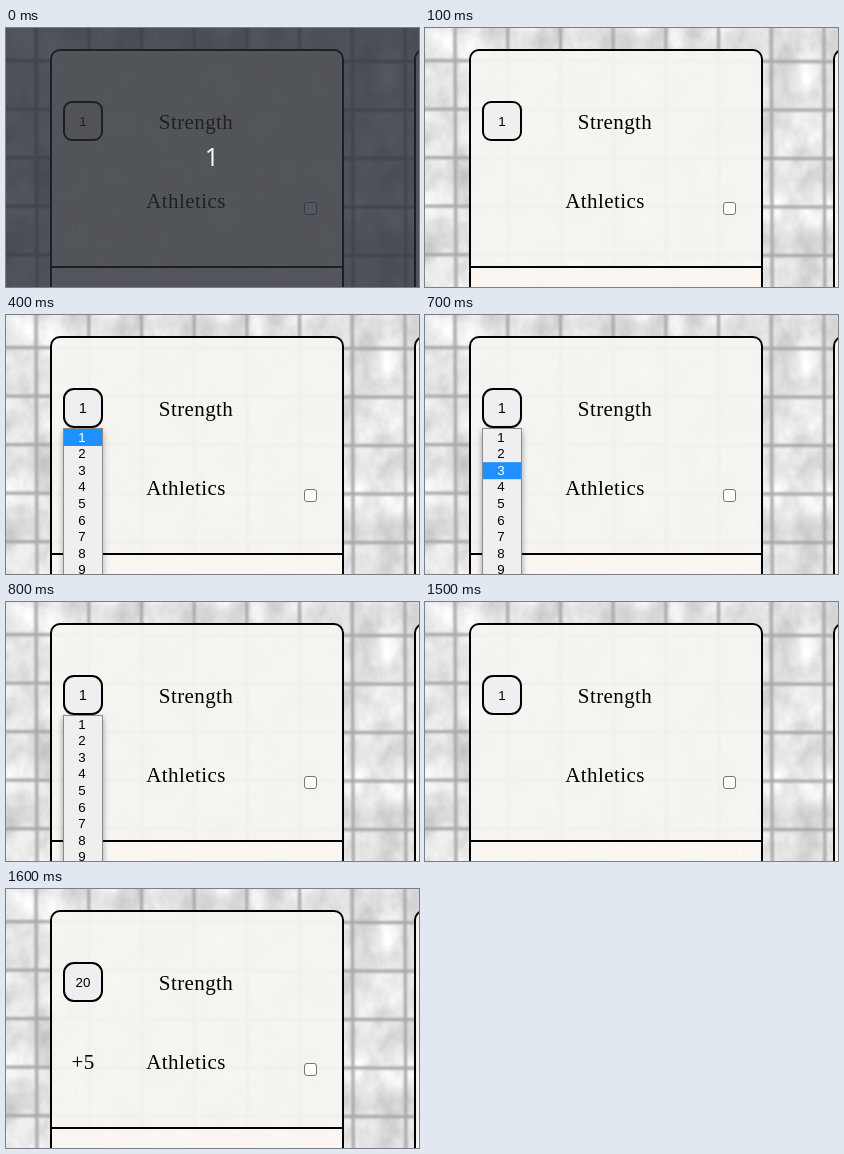
An HTML page that plays this animation: 413x259 px, repeating every 6200 ms.

```html
<!DOCTYPE html>
<html lang="en">
<head>
<meta charset="utf-8">
<title>Ability score picker</title>
<style>
  html, body { margin: 0; width: 100%; height: 100%; overflow: hidden; background: #e5e5e5; }
  svg { display: block; width: 413px; height: 259px; }
  text { text-anchor: middle; }
  .label { font: 21px "Liberation Serif", "Noto Serif", serif; letter-spacing: .4px; }
  .ui { font: 13.33px "Liberation Sans", Arial, sans-serif; }
  .count { font: 25px "Open Sans", "Noto Sans", sans-serif; fill: #fff; }
</style>
</head>
<body>
<svg viewBox="0 0 413 259">
  <defs>
    <filter id="paper" x="0" y="0" width="100%" height="100%" color-interpolation-filters="sRGB">
      <feTurbulence type="fractalNoise" baseFrequency=".035 .025" numOctaves="4" seed="8"/>
      <feColorMatrix values=".32 0 0 0 .735  .32 0 0 0 .735  .32 0 0 0 .735  0 0 0 0 1"/>
    </filter>
    <filter id="soft" x="-10%" y="-10%" width="120%" height="120%">
      <feGaussianBlur stdDeviation=".8"/>
    </filter>
    <filter id="shade" x="-50%" y="-20%" width="200%" height="140%">
      <feGaussianBlur stdDeviation="3"/>
    </filter>
  </defs>

  <rect width="413" height="259" fill="#e5e5e5" filter="url(#paper)"/>
  <path id="grid" fill="none" stroke="#a9a9a9" stroke-width="3.2" filter="url(#soft)"/>

  <g stroke="#000" stroke-width="2">
    <rect x="45" y="22" width="292" height="300" rx="9" fill="#f7f6f1" fill-opacity=".93"/>
    <rect x="409" y="22" width="292" height="300" rx="9" fill="#f7f6f1" fill-opacity=".93"/>
    <rect x="46" y="240" width="290" height="20" fill="#fcf7f1" fill-opacity=".7" stroke="none"/>
    <path d="M45 239H337"/>
  </g>

  <text class="label" x="190" y="101">Strength</text>
  <text class="label" x="180" y="180">Athletics</text>
  <text class="label" id="bonus" x="77" y="180">+5</text>
  <rect x="298.5" y="174.5" width="12" height="12" rx="2.5" fill="#fff" stroke="#767676"/>

  <rect id="box" x="58" y="74" width="38" height="38" stroke="#000" stroke-width="2"/>
  <text class="ui" id="score" x="77" y="98"></text>

  <g id="menu">
    <rect id="shadow" x="57" y="116" width="40" height="160" filter="url(#shade)"/>
    <rect x="57.5" y="113.5" width="39" height="160" fill="#efeff0" stroke="#8b8b8b"/>
    <rect id="mark" x="58" width="38" height="17" fill="#1e90ff"/>
    <g id="options"></g>
  </g>

  <g id="cover">
    <rect width="413" height="259" fill="#242830" fill-opacity=".78"/>
    <text class="count" x="206" y="138">1</text>
  </g>
</svg>
<script>
  const LOOP = 6200;
  const ROW = 16.6;
  const $ = id => document.getElementById(id);
  const show = (id, on) => $(id).setAttribute("display", on ? "inline" : "none");
  const set = (id, attrs) => {
    for (const name in attrs) $(id).setAttribute(name, attrs[name]);
  };

  let lines = "";
  for (let x = -22.7; x < 413; x += 52.7) lines += `M${x} -5L${x + 1} 264`;
  for (let y = 33; y < 259; y += 48.5) lines += `M-5 ${y - .4}L418 ${y + .6}`;
  set("grid", { d: lines });

  const options = Array.from({ length: 9 }, (_, i) => {
    const option = document.createElementNS("http://www.w3.org/2000/svg", "text");
    option.setAttribute("class", "ui");
    option.setAttribute("x", 76);
    option.setAttribute("y", 126.5 + i * ROW);
    option.textContent = i + 1;
    $("options").append(option);
    return option;
  });

  function draw(t) {
    const open = t >= 400 && t < 1500;
    const focused = t >= 400;
    const chosen = t >= 1600;
    const picked = t < 700 ? 0 : t < 800 ? 2 : -1;

    show("cover", t < 100);
    show("menu", open);
    show("mark", picked >= 0);
    show("bonus", chosen);

    set("box", { rx: focused ? 10 : 8, fill: focused ? "#efeff1" : "#f0efef" });
    set("shadow", { opacity: t < 500 ? .3 : .36 });
    set("mark", { y: 114 + Math.max(picked, 0) * ROW });
    options.forEach((option, i) => option.setAttribute("fill", i === picked ? "#fff" : "#000"));

    $("score").textContent = chosen ? "20" : "1";
    $("score").style.fontSize = open ? "14px" : "13.33px";
  }

  const start = performance.now();
  function tick() {
    draw((performance.now() - start) % LOOP);
    requestAnimationFrame(tick);
  }
  tick();
</script>
</body>
</html>
```
